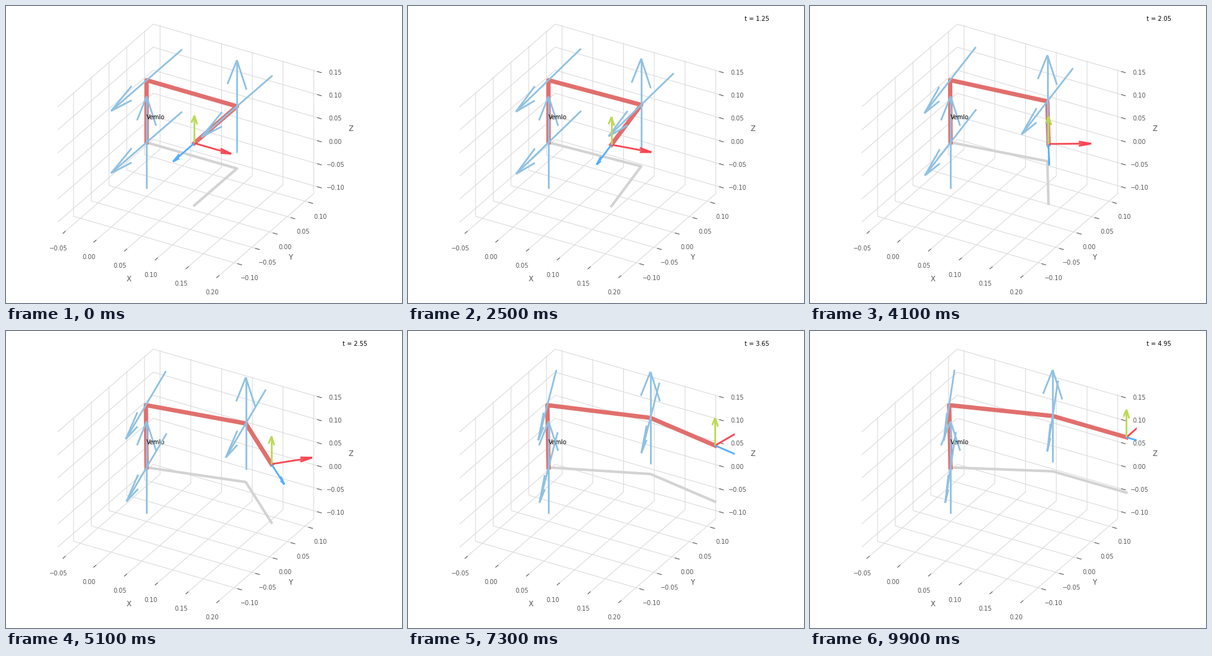
Animation, 640 px wide and 480 px high, one loop 10 s. Source, as a matplotlib script:

```python
import numpy as np
import matplotlib.pyplot as plt
from matplotlib.animation import FuncAnimation

FRAMES, INTERVAL, DT = 100, 100, 0.05
LOWER, UPPER, TOOL = 0.135, 0.147, 0.12
AXIS_LEN, FRAME_LEN = 0.2, 0.06
WRIST_GOAL = np.array([0.13, 0.0625, 0.12])
YAW_GOAL = np.pi / 2
JOINT_COLOR = "#8FC1E2"
FRAME_COLORS = ("#F84752", "#BADA55", "#54AEFF")
UP = np.array([0.0, 0.0, 1.0])

plt.rcParams.update({
    "font.family": "DejaVu Sans",
    "font.size": 7,
    "axes.labelsize": "large",
    "axes.labelcolor": "#555555",
    "axes.labelpad": 1,
    "axes.edgecolor": "white",
    "axes.linewidth": 1,
    "axes.facecolor": "white",
    "xtick.color": "#555555",
    "ytick.color": "#555555",
    "xtick.major.size": 1.5,
    "ytick.major.size": 1.5,
    "grid.color": "#dbdbdb",
    "grid.linestyle": "-",
})


def solve_wrist(p):
    """Base yaw, lower arm tilt and upper arm pitch that reach wrist point p."""
    r, z = np.hypot(p[0], p[1]), p[2]
    d = np.hypot(r, z)
    lift = np.arccos((LOWER**2 + d**2 - UPPER**2) / (2 * LOWER * d))
    lean = np.pi / 2 - np.arctan2(z, r) - lift
    pitch = np.arctan2(z - LOWER * np.cos(lean), r - LOWER * np.sin(lean))
    return np.array([np.arctan2(p[1], p[0]), lean, pitch])


GOAL = np.append(solve_wrist(WRIST_GOAL), YAW_GOAL)


def quintic(u):
    return u**3 * (10 - 15 * u + 6 * u**2)


def heading(a):
    return np.array([np.cos(a), np.sin(a), 0.0])


fig = plt.figure(figsize=(6.4, 4.8), dpi=100, facecolor="white")
ax = fig.add_subplot(projection="3d", proj_type="ortho")
fig.subplots_adjust(left=-0.09, bottom=0, top=1, right=0.99)

# Equal limits around the arm, with a small outer margin
half = 0.5 * 1.1 * (LOWER + AXIS_LEN / 2) * 25 / 24
ax.set_xlim(UPPER / 2 - half, UPPER / 2 + half)
ax.set_ylim(-0.01 - half, -0.01 + half)
ax.set_zlim(0.0175 - half, 0.0175 + half)
ax.set(xlabel="X", ylabel="Y", zlabel="Z")
for axis in (ax.xaxis, ax.yaxis, ax.zaxis):
    axis.set_pane_color((1, 1, 1, 1))
    axis.line.set_color("white")

ax.text(0, 0, 0.05, "Vemlo")
clock = fig.text(0.85, 0.95, "")
shadow, = ax.plot([], [], [], color="lightgrey", lw=3)
arm, = ax.plot([], [], [], color="#E16F6D", lw=5)
arrows = []


def arrow(start, vec, color):
    arrows.append(ax.quiver(*start, *vec, color=color, lw=2))


def joint(center, direction):
    arrow(center - direction * AXIS_LEN / 2, direction * AXIS_LEN, JOINT_COLOR)


def update(i):
    yaw, lean, pitch, tool_yaw = GOAL * quintic(i / (FRAMES - 1))
    out = heading(yaw)
    hinge = heading(yaw - np.pi / 2)
    side, ahead = heading(tool_yaw), heading(tool_yaw - np.pi / 2)

    base = np.zeros(3)
    shoulder = LOWER * (np.sin(lean) * out + np.cos(lean) * UP)
    wrist = shoulder + UPPER * (np.cos(pitch) * out + np.sin(pitch) * UP)
    tip = wrist + TOOL * ahead
    x, y, z = np.array([base, shoulder, wrist, tip]).T
    arm.set_data_3d(x, y, z)
    shadow.set_data_3d(x, y, 0 * z)

    while arrows:
        arrows.pop().remove()
    for center, direction in ((base, UP), (base, hinge), (shoulder, hinge),
                              (wrist, hinge), (wrist, UP)):
        joint(center, direction)
    for vec, color in zip((side, UP, ahead), FRAME_COLORS):
        arrow(tip, vec * FRAME_LEN, color)

    clock.set_text(f"t = {i * DT:.2f}" if i else "")
    return [arm, shadow, clock, *arrows]


anim = FuncAnimation(fig, update, frames=FRAMES, interval=INTERVAL,
                     repeat=True, repeat_delay=0, blit=False)
plt.show()
```
